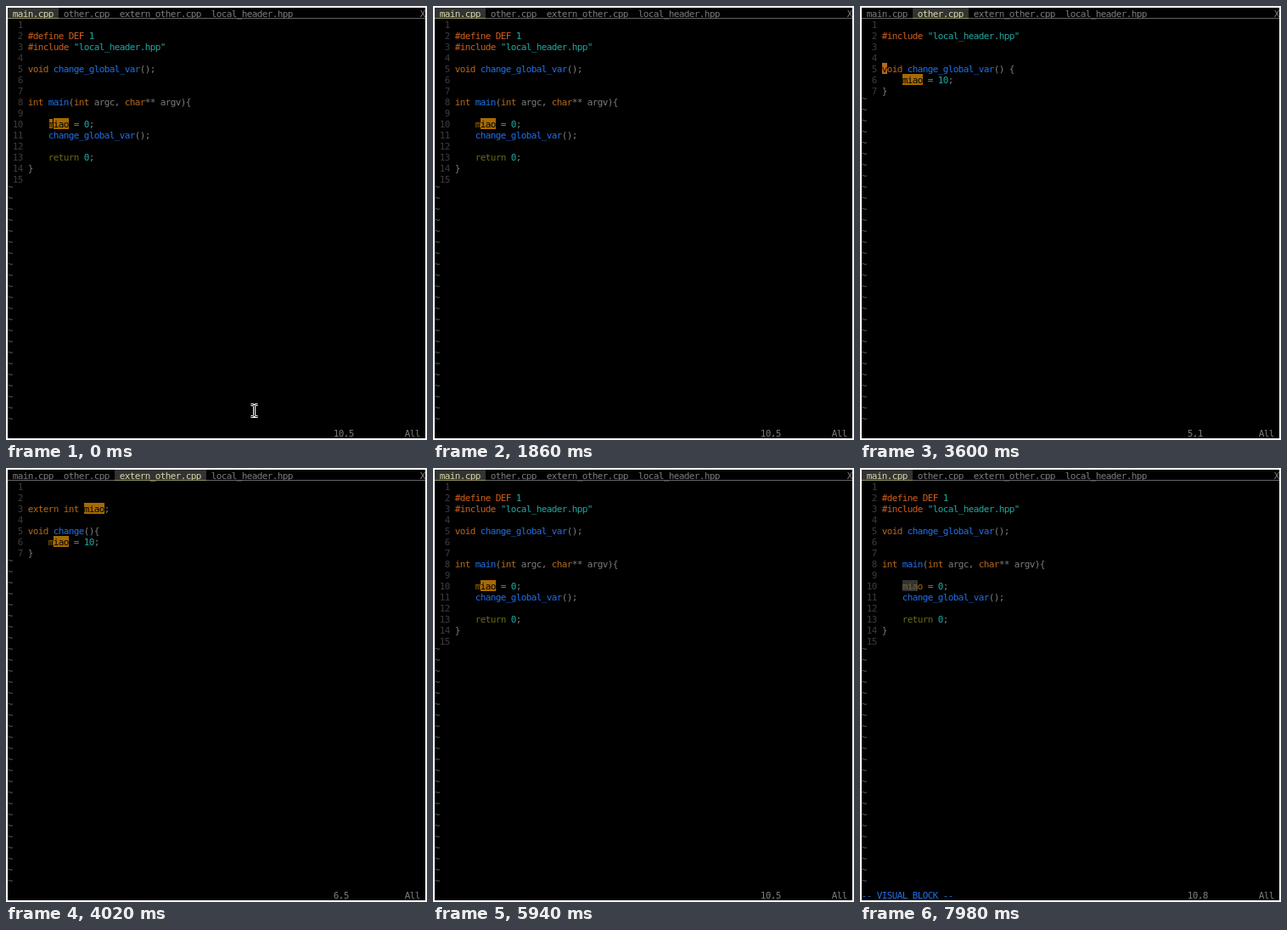
An HTML page with a canvas that plays this animation: 496x511 px, repeating every 8000 ms.

```html
<!DOCTYPE html>
<html lang="en">
<head>
<meta charset="utf-8">
<title>Editor tabs</title>
<style>
  html, body { margin: 0; width: 496px; height: 511px; overflow: hidden; background: #fff; }
  canvas { display: block; }
</style>
</head>
<body>
<canvas id="stage" width="496" height="511"></canvas>
<script>
const ctx = document.getElementById('stage').getContext('2d');
const LOOP = 8000, CELL_W = 6, CELL_H = 13, EDGE = 2, GUTTER = 4, COLS = 82, LAST_ROW = 38;

const color = {
  text: '#7c7c7c', number: '#3c3c3c', tilde: '#566060', directive: '#d2601c', type: '#b8681c',
  name: '#2070e8', literal: '#20a8a0', flow: '#6b6a18', match: '#a66a00',
  select: '#333', selectText: '#79643c', tabText: '#d8d8ac', tabLine: '#646464'
};

const files = [
  ['main.cpp', `
#define DEF 1
#include "local_header.hpp"

void change_global_var();


int main(int argc, char** argv){

    miao = 0;
    change_global_var();

    return 0;
}
`],
  ['other.cpp', `
#include "local_header.hpp"


void change_global_var() {
    miao = 10;
}`],
  ['extern_other.cpp', `

extern int miao;

void change(){
    miao = 10;
}`],
  ['local_header.hpp', `
#pragma once

#ifndef DEF
#define EXTERN extern
#else
#define EXTERN
#endif

EXTERN int dont_touch_this_var;
EXTERN int miao;
EXTERN int dont_touch_this_var_neither;
`]
].map(([name, code]) => ({ name, lines: code.split('\n') }));

// Cursor states; anchor is the first column of a block selection.
const steps = [
  { at: 0, file: 0, row: 10, col: 5, idle: true },
  { at: 1320, file: 0, row: 10, col: 5 },
  { at: 2700, file: 1, row: 5, col: 1 },
  { at: 4020, file: 2, row: 6, col: 5 },
  { at: 4800, file: 3, row: 11, col: 12 },
  { at: 5940, file: 0, row: 10, col: 5 },
  { at: 7080, file: 0, row: 10, col: 5, anchor: 5 },
  { at: 7560, file: 0, row: 10, col: 6, anchor: 5 },
  { at: 7680, file: 0, row: 10, col: 7, anchor: 5 },
  { at: 7800, file: 0, row: 10, col: 8, anchor: 5 }
];

const syntax = [
  [/"[^"]*"|\b\d+\b/g, color.literal],
  [/\b(void|int|char|extern)\b/g, color.type],
  [/\breturn\b/g, color.flow],
  [/\b(change\w*|main)\b/g, color.name]
];

const colX = col => EDGE + col * CELL_W;
const rowY = row => EDGE + row * CELL_H;

function fillCells(col, row, count, fill) {
  ctx.fillStyle = fill;
  ctx.fillRect(colX(col), rowY(row), count * CELL_W, CELL_H);
}

function write(text, col, row, fill, lift = 0) {
  ctx.fillStyle = fill;
  [...text].forEach((ch, i) => {
    if (ch !== ' ') ctx.fillText(ch, colX(col + i) + CELL_W / 2, rowY(row) + 11 - lift);
  });
}

function cellStyles(line) {
  const directive = line.startsWith('#');
  const cells = [...line].map(() => ({ fg: directive ? color.directive : color.text }));
  const paint = (pattern, style) => {
    for (const m of line.matchAll(pattern))
      for (let i = 0; i < m[0].length; i++) cells[m.index + i] = style;
  };
  for (const [pattern, fg] of directive ? syntax.slice(0, 1) : syntax) paint(pattern, { fg });
  paint(/miao/g, { fg: '#000', bg: color.match });
  return cells;
}

function drawTabs(active) {
  let col = 0;
  files.forEach(({ name }, i) => {
    const on = i === active, width = name.length + 2;
    if (on) fillCells(col, 0, width, color.select);
    write(name, col + 1, 0, on ? color.tabText : color.text);
    ctx.fillStyle = on ? '#8c8c5c' : color.tabLine;
    ctx.fillRect(colX(col), 14, width * CELL_W, 1);
    col += width;
  });
  write('X', COLS - 1, 0, color.text);
  ctx.fillStyle = color.tabLine;
  ctx.fillRect(colX(col), 14, (COLS - col) * CELL_W, 1);
}

function drawLine(line, row, state) {
  write(String(row).padStart(3), 0, row, color.number);
  cellStyles(line).forEach(({ fg, bg }, i) => {
    const col = i + 1, here = row === state.row;
    const cursor = here && col === state.col;
    if (here && col >= state.anchor && col < state.col) {
      bg = color.select;
      fg = color.selectText;
    } else if (cursor && !state.idle) {
      [fg, bg] = [bg || '#000', fg];
    }
    if (bg) fillCells(GUTTER + i, row, 1, bg);
    write(line[i], GUTTER + i, row, fg);
    if (cursor && state.idle) {
      ctx.strokeStyle = '#000';
      ctx.lineWidth = 1;
      ctx.strokeRect(colX(GUTTER + i) + .5, rowY(row) + .5, CELL_W - 1, CELL_H - 1);
    }
  });
}

function drawPointer() {
  const beam = new Path2D('M288.5 469.5H291L292.5 471L294 469.5H296.5M292.5 471V482M288.5 483.5H291L292.5 482L294 483.5H296.5');
  for (const [width, stroke] of [[3, '#fff'], [1, '#000']]) {
    ctx.lineWidth = width;
    ctx.strokeStyle = stroke;
    ctx.stroke(beam);
  }
}

function draw(now) {
  const time = now % LOOP;
  const state = steps.findLast(s => s.at <= time);
  const { lines } = files[state.file];

  ctx.fillStyle = '#fff';
  ctx.fillRect(0, 0, 496, 511);
  ctx.fillStyle = '#000';
  ctx.fillRect(EDGE, EDGE, 492, 507);
  ctx.font = '11px "DejaVu Sans Mono", monospace';
  ctx.textAlign = 'center';

  drawTabs(state.file);
  lines.forEach((line, i) => drawLine(line, i + 1, state));
  for (let row = lines.length + 1; row < LAST_ROW; row++) write('~', 0, row, color.tilde, 4);

  if (state.anchor) write('-- VISUAL BLOCK --', 0, LAST_ROW, color.name);
  write(`${state.row},${state.col}`, 64, LAST_ROW, color.text);
  write('All', 78, LAST_ROW, color.text);
  if (state.idle) drawPointer();
  requestAnimationFrame(draw);
}
requestAnimationFrame(draw);
</script>
</body>
</html>
```
